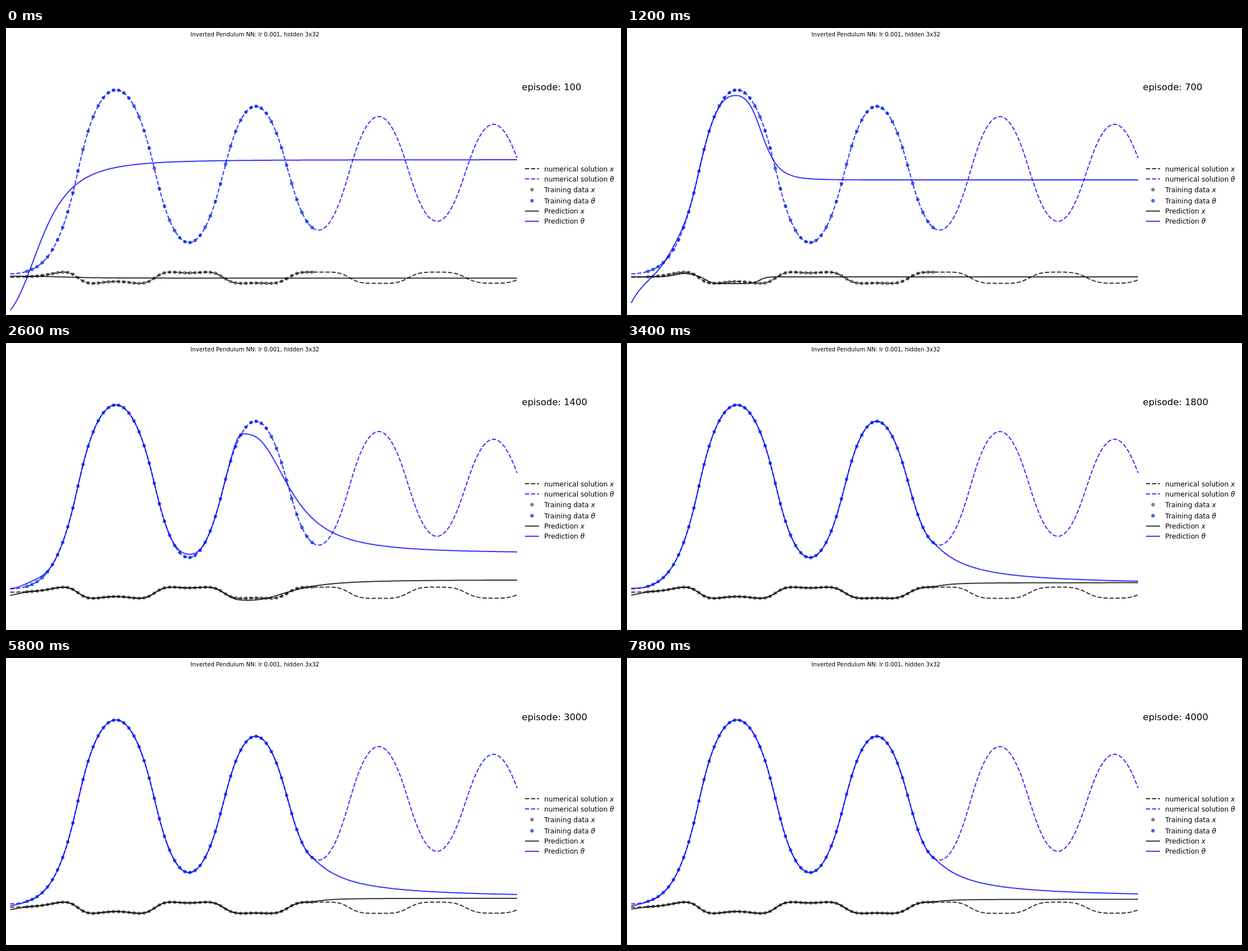
Recreate the animation shown at these times as an HTML page. Size 1095x512 px, loop 8000 ms.

```html
<!DOCTYPE html>
<html lang="en">
<head>
<meta charset="utf-8">
<title>Pendulum fit</title>
<style>
html, body { margin: 0; width: 100%; height: 100%; overflow: hidden; background: #fff; }
svg { display: block; width: 1095px; height: 512px; }
text { font-family: "DejaVu Sans", sans-serif; fill: #000; }
path { fill: none; stroke-width: 2; stroke-opacity: .8; stroke-linejoin: round; }
.x { stroke: #000; }
.th { stroke: #00f; }
.dash { stroke-dasharray: 7.5 3.25; }
.dx { fill: #000; fill-opacity: .5; }
.dth { fill: #4169e1; }
.label { font-size: 12.2px; }
.label tspan { font-style: italic; }
</style>
</head>
<body>
<svg id="stage" viewBox="0 0 1095 512" xmlns="http://www.w3.org/2000/svg">
  <text x="328.6" y="15.3" font-size="10.1">Inverted Pendulum NN: lr 0.001, hidden 3x32</text>
  <text id="episode" x="918.6" y="111.4" font-size="16.35"></text>
</svg>
<script>
const STEP = 200, STEPS = 40;
const LEFT = 7.5, RIGHT = 910;
const svg = document.getElementById('stage');
const episode = document.getElementById('episode');

const lerp = (a, b, s) => a + (b - a) * s;
const sigmoid = z => 1 / (1 + Math.exp(-z));
const bump = (x, c, w) => Math.exp(-(((x - c) / w) ** 2));
// Falls from 1 to 0, half way at c + s.
const hill = (x, c, s, p) => 1 / (1 + (Math.max(0, x - c) / s) ** p);
// Changes softly from curve f to curve g around x = at.
const join = (f, g, at, soft) => x => lerp(f(x), g(x), sigmoid((x - at) / soft));

// Damped pendulum on a cart, released near upright.
const DT = .002, MASS = 1 / 6, DAMP = .0346, RELEASE = .1;
const angles = [], turns = [];
for (let a = RELEASE, v = 0, i = 0; i * DT < 36; i++) {
  angles.push(a);
  const sin = Math.sin(a), cos = Math.cos(a), before = v;
  v += DT * (sin - MASS * sin * cos * v * v - DAMP * v) / (1 - MASS * cos * cos);
  a += DT * v;
  if (before * v < 0) turns.push(i);
}

// The first and the fourth crest fix the time axis.
const CREST1 = 195.8, CREST4 = 868;
const pace = (turns[6] - turns[0]) / (CREST4 - CREST1);
function angle(x) {
  const t = Math.max(0, turns[0] + (x - CREST1) * pace), i = Math.floor(t);
  return lerp(angles[i], angles[i + 1], t - i);
}

const ZERO = 444.5, UNIT = 60.3;
const theta = x => ZERO - UNIT * angle(x);
const pos = x => ZERO - UNIT * MASS * (Math.sin(angle(x)) - RELEASE);
const blurred = (f, d) => x => (f(x - d) + 2 * f(x) + f(x + d)) / 4;
const startError = x => Math.max(0, 1 - (x - LEFT) / 35) ** 1.3;

// Early fits: a plateau, then one swing learned, then nearly two.
const early = [
  {
    ep: 100,
    th: x => 235 + 285 * hill(x, -40, 103, 3.6),
    x: x => 446.2 - 3.5 * hill(x, -40, 150, 5)
  },
  {
    ep: 700,
    th: join(
      x => theta(x) + 52 * Math.exp((LEFT - x) / 27) - 9 * bump(x, 85, 25) + 10 * bump(x, 197, 25),
      x => 271 - 152 * hill(x, 150, 92.5, 6.7), 200, 3),
    x: x => 443.9 - 6 * bump(x, 103, 24) + 12.2 * (sigmoid((x - 141) / 6) - sigmoid((x - 236) / 6))
  },
  {
    ep: 1400,
    th: join(
      x => theta(x) - 6 * bump(x, 46, 25) - 6 * bump(x, 324, 20),
      x => 375 - 212 * hill(x, 425, 86, 2.6), 414, 5),
    x: join(
      x => blurred(pos, 9)(x) + 6 * startError(x),
      x => 422.5 + 36.5 * hill(x, 425, 90, 2.6), 408, 6)
  }
];

// Late fits follow all the data; only the start and the tail still move.
const LATE = 1800, LAST = 100 * STEPS;
function late(ep) {
  const q = (ep - LATE) / (LAST - LATE);
  const thetaEnd = 431.5 - 4.5 * Math.sqrt(q), posEnd = 427.5 + 3 * q ** 1.5;
  const thetaError = Math.min(3.5, 12 * q - 1), posError = 5.5 - 2 * q;
  const smooth = blurred(pos, 9 - 6 * q);
  return {
    ep,
    th: x => x < 541 ? theta(x) + thetaError * startError(x)
                     : lerp(thetaEnd, 352, hill(x, 540, 54, 1.25)),
    x: x => x < 541 ? smooth(x) + posError * startError(x)
                    : lerp(posEnd, 435.2, hill(x, 540, 28, 1.7))
  };
}

// The left side of the plot is learned first.
function fit(ep) {
  if (ep >= LATE) return late(ep);
  const keys = [...early, late(LATE)];
  const i = keys.findIndex(k => k.ep > ep), a = keys[i - 1], b = keys[i];
  const s = (ep - a.ep) / (b.ep - a.ep);
  const mix = f => x => lerp(a[f](x), b[f](x), s ** (.6 + x / RIGHT));
  return { th: mix('th'), x: mix('x') };
}

function add(tag, attrs) {
  const el = document.createElementNS('http://www.w3.org/2000/svg', tag);
  for (const k in attrs) el.setAttribute(k, attrs[k]);
  return svg.appendChild(el);
}

function plot(f) {
  const pts = [];
  for (let x = LEFT; x <= RIGHT; x += 2) pts.push(x + ' ' + f(x).toFixed(2));
  return 'M' + pts.join('L') + `L${RIGHT} ${f(RIGHT).toFixed(2)}`;
}

const dot = (cls, cx, cy) => add('circle', { class: 'd' + cls, cx, cy, r: 3.1 });

for (let i = 0; i < 57; i++) {
  const x = 37.5 + 9.0625 * i;
  dot('x', x, pos(x));
  dot('th', x, theta(x));
}
add('path', { class: 'x dash', d: plot(pos) });
add('path', { class: 'th dash', d: plot(theta) });
const posFit = add('path', { class: 'x' });
const thetaFit = add('path', { class: 'th' });

function legend(name, cls, kind, y) {
  if (kind === 'dot') dot(cls, 936.5, y);
  else add('path', { class: cls + ' ' + kind, d: `M924 ${y}H949` });
  const label = add('text', { class: 'label', x: 958.3, y: y + 4.6 });
  label.innerHTML = `${name} <tspan>${cls === 'x' ? 'x' : 'θ'}</tspan>`;
}
legend('numerical solution', 'x', 'dash', 251);
legend('numerical solution', 'th', 'dash', 269.3);
legend('Training data', 'x', 'dot', 288.4);
legend('Training data', 'th', 'dot', 308.2);
legend('Prediction', 'x', 'solid', 326.6);
legend('Prediction', 'th', 'solid', 344.8);

function draw(step) {
  const ep = 100 * (step + 1), now = fit(ep);
  thetaFit.setAttribute('d', plot(now.th));
  posFit.setAttribute('d', plot(now.x));
  episode.textContent = 'episode: ' + ep;
}

const start = performance.now();
let shown = -1;
function tick() {
  const step = Math.floor((performance.now() - start) / STEP) % STEPS;
  if (step !== shown) draw(shown = step);
  requestAnimationFrame(tick);
}
tick();
</script>
</body>
</html>
```
